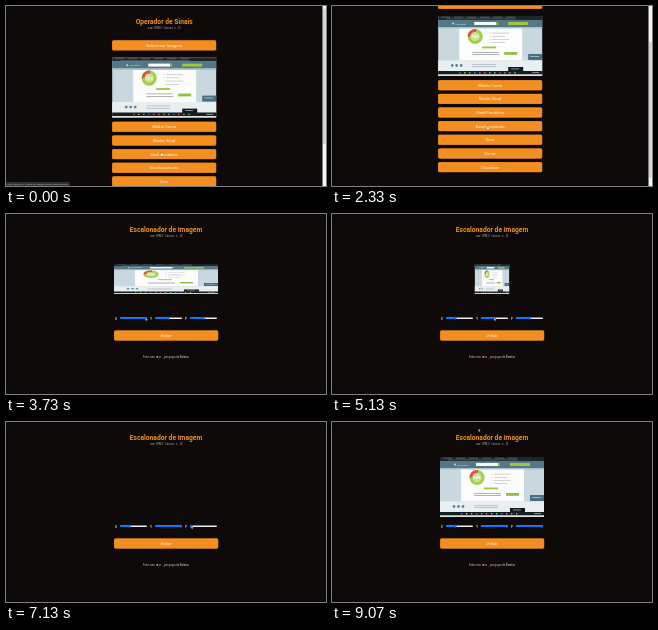
Animation, 320 px wide and 180 px high, one loop 9.14 s. Source, as an HTML page with a canvas:

```html
<!DOCTYPE html>
<html lang="pt">
<head>
<meta charset="utf-8">
<title>Operador de Sinais</title>
<style>
  html, body { margin: 0; width: 100%; height: 100%; overflow: hidden; background: #0d0a09; }
  canvas { display: block; width: 320px; height: 180px; }
</style>
</head>
<body>
<canvas id="stage"></canvas>
<script>
const LOOP = 9140, PAGE_CHANGE = 2450, ORANGE = '#f28f20', BLUE = '#0b72f5';
const SITE = 'https://dupla7777.github.io/operador-sinais/';
const canvas = document.getElementById('stage');
const ctx = canvas.getContext('2d');
const dpr = window.devicePixelRatio || 1;
canvas.width = 320 * dpr;
canvas.height = 180 * dpr;

const mix = (a, b, k) => a + (b - a) * k;

// Smooth step from 0 to 1 between two times
function ease(t, start, end) {
  const k = Math.min(1, Math.max(0, (t - start) / (end - start)));
  return k * k * (3 - 2 * k);
}

function rect(x, y, w, h, color, r = 0) {
  ctx.fillStyle = color;
  ctx.beginPath();
  ctx.roundRect(x, y, w, h, r);
  ctx.fill();
}

function disc(x, y, r, color, from = 0, to = Math.PI * 2) {
  ctx.fillStyle = color;
  ctx.beginPath();
  ctx.moveTo(x, y);
  ctx.arc(x, y, r, from, to);
  ctx.fill();
}

function text(str, x, y, size, color = '#fff', align = 'center', weight = 400, family = 'Roboto, sans-serif') {
  ctx.font = `${weight} ${size}px ${family}`;
  ctx.textAlign = align;
  ctx.fillStyle = color;
  ctx.fillText(str, x, y);
}

function heading(title, x, y) {
  text(title, x, y, 6.7, ORANGE, 'center', 700);
  text('com HTML5 Canvas e JS', x, y + 4.6, 2.6, '#b5b2b0', 'center', 400, '"Noto Sans Mono", monospace');
}

function button(label, x, y) {
  rect(x, y, 104.3, 10.4, '#c9741a', 1.6);
  rect(x + .4, y + .4, 103.5, 9.6, ORANGE, 1.4);
  text(label, x + 52.1, y + 6.7, 4.2, '#fff3e2');
}

// Screenshot of a web page, 104 by 60, centred on (cx, cy)
function picture(cx, cy, sx, sy) {
  if (sx <= 0 || sy <= 0) return;
  ctx.save();
  ctx.translate(cx, cy);
  ctx.scale(sx, sy);
  ctx.translate(-52, -30);
  rect(0, 0, 104, 60, '#c9d7df');
  rect(0, 0, 104, 4, '#20252a');
  for (let i = 0; i < 6; i++) rect(3 + i * 13, .8, 9, .7, '#68747a');
  rect(8, 2.6, 70, .7, '#596267');
  rect(0, 4, 104, 7, '#527787');
  disc(15, 7.6, 1, '#c5dce5');
  text('Consultas', 17, 8.6, 2.4, '#e5eff3', 'left');
  rect(36, 6, 22, 3, '#f7fafa');
  rect(58, 6, 2, 3, '#91bb3c');
  rect(70, 6, 20, 3, '#a0c63f');
  rect(0, 11, 104, 1.5, '#a9c1cc');
  rect(21, 12.5, 63, 32, '#fbfcfb');

  disc(37, 20.5, 7.6, '#a3cf45');
  disc(37, 20.5, 7.6, '#e0514d', Math.PI, Math.PI * 1.55);
  disc(37, 20.5, 4.6, '#cfe09a');
  text('72%', 37, 22.1, 4.2, '#fff', 'center', 700);
  for (let i = 0; i < 4; i++) {
    disc(52, 17 + i * 3.2, .4, i ? '#98bf45' : '#df4b45');
    rect(54, 16.8 + i * 3.2, 17 - i % 2 * 4, .5, '#a5a9aa');
  }
  rect(44, 30.5, 14, 1.8, '#98c83d');
  for (const y of [36, 38.4]) rect(34, y, 27, .6, '#7c8385');
  rect(66, 36, 13, 2.8, '#91bf43');
  rect(90, 38, 14, 6, '#476f83');
  rect(92, 40, 9, .7, '#c4d8e1');

  rect(0, 44.5, 104, 11, '#e9eef0');
  for (let i = 0; i < 3; i++) disc(14 + i * 4.5, 49.5, 1.4, '#5c8499');
  for (const y of [48, 50.3]) rect(34, y, 24, .6, '#9ba8af');
  rect(70, 51, 15, 4.5, '#14191c');
  rect(73, 52.6, 8, .7, '#b9c2c5');
  rect(0, 55, 104, 3.5, '#171d21');
  for (let i = 0; i < 12; i++) rect(21 + i * 5, 56.1, 1.3, 1.3, `hsl(${i * 75} 50% 60%)`);
  rect(94, 56.3, 7, .8, '#adb5b8');
  rect(0, 58.5, 104, 1.5, '#dde4e6');
  ctx.restore();
}

function status(url) {
  ctx.font = '2.35px Roboto, sans-serif';
  rect(0, 176, ctx.measureText(url).width + 2.4, 4, '#303134', .6);
  text(url, 1.2, 178.9, 2.35, '#c3c4c6', 'left');
}

function menuPage(t) {
  const scroll = -.6 + ease(t, 70, 930) + 40.6 * ease(t, 1030, 1400);
  ctx.save();
  ctx.translate(0, -scroll);
  heading('Operador de Sinais', 158.2, 17.4);
  button('Selecionar Imagem', 106, 33.6);
  picture(158.2, 81, 1, 1);
  ['Mudar Cores', 'Mudar Sinal', 'Sinal Periódico', 'Escalonamento', 'Girar', 'Cortar', 'Visualizar']
    .forEach((label, i) => button(label, 106, 115 + i * 13.65));
  ctx.restore();

  rect(316.5, 0, 3.5, 180, '#f3f3f3');
  rect(317, 2.5 + Math.max(0, scroll) * .82, 2.6, 135.5, '#d2d2d2');
  if (t < 1070) status(SITE + (t < 500 ? 'sinal-periodico' : 'escalonar'));
}

const knobX = (left, value) => left + 1.3 + value * 24.4;

function slider(label, left, value) {
  const knob = knobX(left, value);
  text(label, left - 4, 105.6, 3.6);
  rect(left, 103.4, 27, 1.7, '#efefef', .8);
  rect(left, 103.4, knob - left, 1.7, BLUE, .8);
  disc(knob, 104.25, 1.4, BLUE);
}

// Slider values: X and Y scale one axis each, P scales both
function scales(t) {
  return {
    x: .5 + .5 * ease(t, 3400, 3700) - .67 * ease(t, 4300, 4800),
    y: .5 + .5 * ease(t, 5200, 5720),
    p: .5 + .15 * ease(t, 6170, 6400) - .65 * ease(t, 6400, 7120) + ease(t, 7310, 8170)
  };
}

function scalePage(t) {
  const { x, y, p } = scales(t);
  heading('Escalonador de Imagem', 160, 18.2);
  if (t < 6170) picture(160, 65, x, y);
  else picture(160, 65, p, p);
  slider('X', 114, x);
  slider('Y', 149, y);
  slider('P', 184, p);
  button('Voltar', 108, 116.3);
  text('Feito com', 137, 144, 2.7, '#d8d6d5', 'left');
  disc(151.3, 143, 1.1, '#e9852b');
  disc(154, 143, 1.1, '#a94638');
  text(', por grupo de Batatas', 183, 144, 2.7, '#d8d6d5', 'right');
}

// The pointer moves to each slider in turn and holds its knob
function pointerAt(t) {
  const { x, y, p } = scales(t);
  const reach = ease(t, PAGE_CHANGE, 3050), leave = ease(t, 8250, 8730);
  let px = mix(155, knobX(114, x), reach);
  px = mix(px, knobX(149, y), ease(t, 4800, 5150));
  px = mix(px, knobX(184, p), ease(t, 5720, 6100));
  const menuY = 146 + 14.5 * ease(t, 70, 930) - 41 * ease(t, 1400, 1870);
  return [mix(px, 146.5, leave), mix(mix(menuY, 104, reach), 6.8, leave)];
}

const HAND = new Path2D('M0 0h.7v1.3l1.5.4v1.6l-.6.8H.3L-.9 2.3l.4-.4.5.4z');
const ARROW = new Path2D('M0 0v2.8l.7-.6.5 1.1.5-.2-.5-1.1h.9z');

function pointer(t) {
  const shape = t < PAGE_CHANGE ? HAND : ARROW;
  ctx.save();
  ctx.translate(...pointerAt(t));
  ctx.fillStyle = '#fff';
  ctx.strokeStyle = '#222';
  ctx.lineWidth = .3;
  ctx.fill(shape);
  ctx.stroke(shape);
  ctx.restore();
}

function draw() {
  const t = performance.now() % LOOP;
  ctx.setTransform(dpr, 0, 0, dpr, 0, 0);
  rect(0, 0, 320, 180, '#0d0a09');
  if (t < PAGE_CHANGE) menuPage(t);
  else scalePage(t);
  pointer(t);
  requestAnimationFrame(draw);
}
draw();
</script>
</body>
</html>
```
